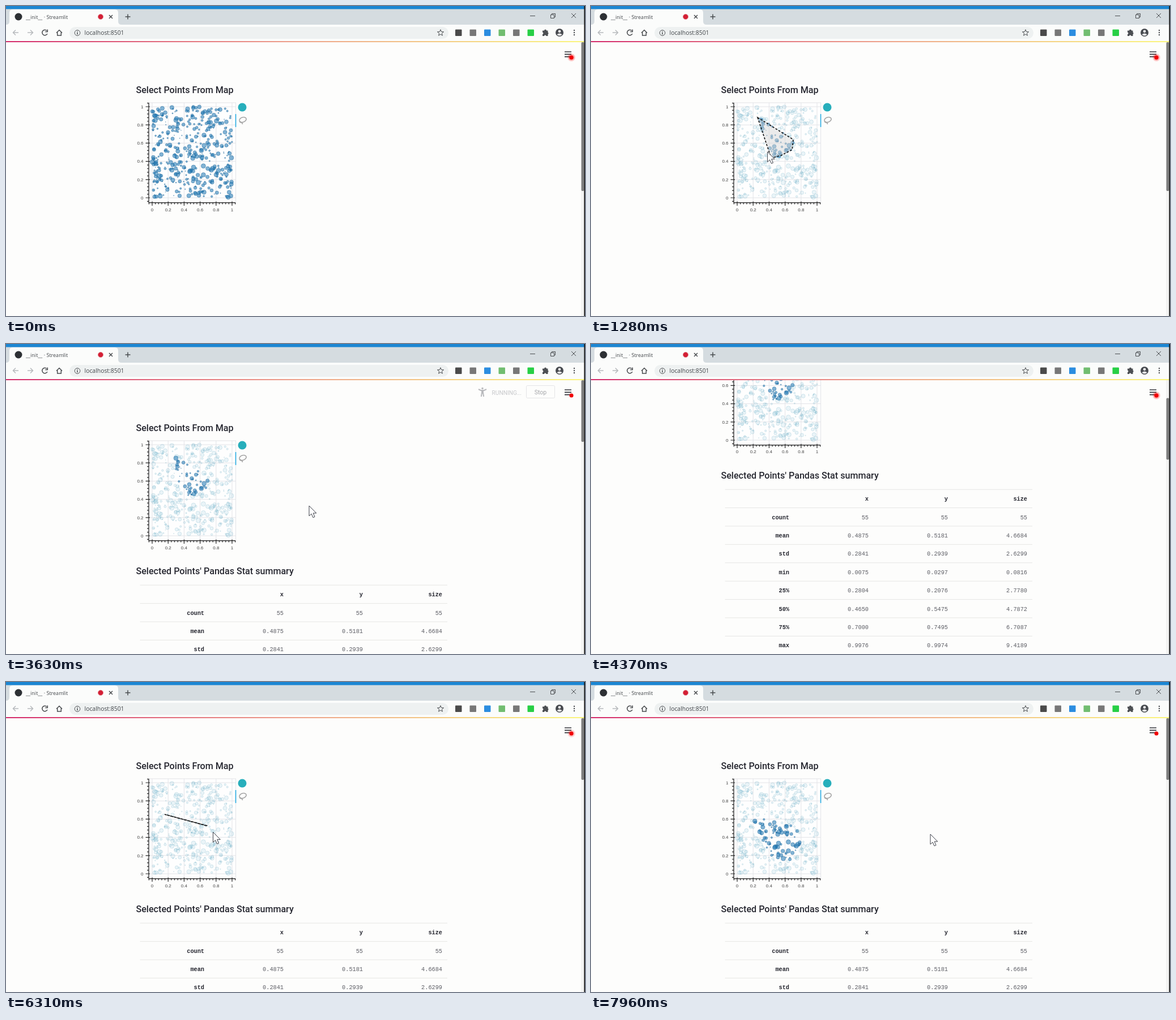
An HTML page for the animation above (8000 ms loop, 1022x548 px).

```html
<!DOCTYPE html>
<html lang="en">
<head>
<meta charset="utf-8">
<title>Select Points From Map</title>
<style>
html, body { margin: 0; width: 100%; height: 100%; overflow: hidden; background: #fdfdfc; }
svg { display: block; width: 1022px; height: 548px; }
.ui { font-family: "Open Sans", sans-serif; fill: #42464a; }
.axis { font: 8px "Liberation Sans", sans-serif; fill: #444; }
.head { font: 500 16.1px Roboto, sans-serif; fill: #262730; }
.cell { font: 10.25px "Liberation Mono", monospace; fill: #5c5d64; text-anchor: end; }
.bold { font-weight: 700; fill: #262730; }
.dot { fill: #1f77b4; stroke: #1f6698; fill-opacity: .56; stroke-opacity: .5; stroke-width: .9; }
.faded { fill: #3f9bc4; stroke: #3a90aa; fill-opacity: .1; stroke-opacity: .2; }
.icon { fill: none; stroke: #4a4d50; stroke-width: 1.5; }
.thin { stroke-width: 1; }
.status { font-family: Roboto, sans-serif; }
</style>
</head>
<body>
<svg viewBox="0 0 1022 548">
  <defs>
    <linearGradient id="rainbow">
      <stop offset="0" stop-color="#d42a6b"/>
      <stop offset=".5" stop-color="#eda08a"/>
      <stop offset="1" stop-color="#fbf67c"/>
    </linearGradient>
    <radialGradient id="halo">
      <stop offset=".3" stop-color="#f00" stop-opacity=".65"/>
      <stop offset="1" stop-color="#f00" stop-opacity="0"/>
    </radialGradient>
  </defs>
  <rect width="1022" height="548" fill="#fdfdfc"/>
  <g id="page">
    <text class="head" x="229.5" y="154">Select Points From Map</text>
    <g id="plot"></g>
    <g id="dots"></g>
    <circle cx="417" cy="179" r="7.5" fill="#27aebb"/>
    <path d="M405.5 191V214" stroke="#26aae1" stroke-width="1.6"/>
    <g fill="none" stroke="#a5a5a5" stroke-width="1.6">
      <ellipse cx="418" cy="201" rx="6.3" ry="4.2" transform="rotate(-20 418 201)"/>
      <path d="M413 203q-1 3 2 3t2 3"/>
    </g>
    <polygon id="lasso" fill="#d3d3d3" fill-opacity=".45" stroke="#111" stroke-width="1.6" stroke-dasharray="3.6 2.6"/>
    <g id="table"></g>
  </g>
  <g id="running">
    <g stroke="#b9babd" stroke-width="2" fill="none">
      <circle cx="841" cy="78.5" r="1.8" fill="#b9babd" stroke="none"/>
      <path d="M841 82V88" stroke-width="4"/>
      <path id="limbs"/>
    </g>
    <text class="status" x="857.5" y="90" font-size="10.2" fill="#c6c7ca">RUNNING...</text>
    <rect x="918.5" y="73.5" width="50" height="22" rx="2" fill="none" stroke="#e4e4e6"/>
    <text class="status" x="943.5" y="88.5" text-anchor="middle" font-size="10.5" fill="#a5a6aa">Stop</text>
  </g>
  <path d="M986 81H998M986 85.3H998M986 89.6H998" stroke="#33343a" stroke-width="1.7"/>
  <circle id="glow" cx="998" cy="91" r="7.5" fill="url(#halo)"/>
  <circle cx="998" cy="91" r="3.5" fill="#f00005"/>
  <rect x="1015" y="64" width="6" height="484" fill="#f3f3f2"/>
  <rect id="thumb" x="1015.5" width="5" rx="2" fill="#7f7f7f"/>
  <path id="cursor" d="M0 0V18L4.1 14.2 7 20.8 10 19.5 7.2 13H12.8Z" fill="#fff" stroke="#3c3f48"/>

  <g id="browser">
    <rect width="1022" height="34" fill="#d5dce0"/>
    <rect width="1022" height="5.5" fill="#1b86d3"/>
    <path d="M0 33Q6 33 6 27V12Q6 6 12 6H192Q198 6 198 12V27Q198 33 204 33H1022V62H0Z" fill="#fbfcfb"/>
    <circle cx="22" cy="19" r="6.5" fill="#2d3034"/>
    <text class="ui" x="35" y="22.5" font-size="9">__init__ · Streamlit</text>
    <circle cx="167" cy="19" r="4.6" fill="#d31f35" stroke="#e58b93"/>
    <path class="icon" d="M182 16L188 22M188 16L182 22M215 14.5V23.5M210.5 19H219.5"/>
    <path class="icon thin" d="M925 17.5H934M998 13L1006 21M1006 13L998 21M961.5 15.5H967.5V21.5H961.5ZM963.5 15V13.5H969.5V19.5H968"/>
    <path class="icon" style="stroke:#b7babd" d="M22 47H12.5M17 42.5L12.5 47L17 51.5M38 47H47.5M43 42.5L47.5 47L43 51.5"/>
    <path class="icon" d="M72 43.5A4.8 4.8 0 1 0 73 49M73.3 41.5V45.5H69.3M89 47.5L94 42.5L99 47.5M90.7 46.5V52H97.3V46.5"/>
    <rect x="112" y="37" width="669" height="21" rx="10.5" fill="#eef1f1"/>
    <circle class="icon thin" cx="126" cy="47.5" r="4.8"/>
    <path class="icon" d="M126 46.5V50.3M126 44.4V45.6"/>
    <text class="ui" x="138.5" y="51.3" font-size="10.4">localhost:8501</text>
    <path id="star" class="icon thin"/>
    <g id="extensions"></g>
    <path d="M947 43.5H950A2 2 0 0 1 954 43.5H956.5V46.5A2 2 0 0 1 956.5 50V53H953.5A1.8 1.8 0 0 0 950 53H947V50A1.8 1.8 0 0 0 947 46.5Z" fill="#4c4f53"/>
    <circle cx="977" cy="47" r="7" fill="#484b50"/>
    <circle cx="977" cy="44.7" r="2.3" fill="#fff"/>
    <path d="M972.5 50.5Q977 46.5 981.5 50.5Q977 54.5 972.5 50.5" fill="#fff"/>
    <path d="M1003 43V52" stroke="#4c4f53" stroke-width="2.4" stroke-linecap="round" stroke-dasharray="0 4"/>
    <rect y="62" width="1022" height="2" fill="url(#rainbow)"/>
  </g>
  <path d="M1021.2 0V548" stroke="#141414" stroke-width="1.6"/>
</svg>
<script>
const LOOP = 8000;
const $ = id => document.getElementById(id);
const range = n => [...Array(n).keys()];
const ramp = (t, from, to) => Math.min(1, Math.max(0, (t - from) / (to - from)));
const text = (cls, x, y, s, extra = '') => `<text class="${cls}" x="${x}" y="${y}" ${extra}>${s}</text>`;

// Plot coordinates
const px = x => 258 + 141 * x;
const py = y => 339 - 161 * y;

function drawPlot() {
  let grid = '', ticks = 'M252 171V348M252 347.7H405', labels = '';
  for (let i = -1; i <= 26; i++) {
    const major = i % 5 === 0, v = i / 25;
    const x = px(v), y = py(v);
    ticks += `M${major ? 246.5 : 249} ${y}H${major ? 254 : 252}`;
    ticks += `M${x} ${major ? 345.5 : 347.7}V${major ? 353 : 350.5}`;
    if (major) {
      grid += `M${x} 171V348M252 ${y}H405`;
      labels += text('axis', 242.5, y + 2.8, v, 'text-anchor="end"');
      labels += text('axis', x, 362.5, v, 'text-anchor="middle"');
    }
  }
  $('plot').innerHTML = `<rect x="252" y="171" width="153.5" height="177" fill="#fefefe" stroke="#e3e4e8"/>
    <path d="${grid}" stroke="#e3e4e8"/><path d="${ticks}" stroke="#222" stroke-width="1.2"/>${labels}`;
}

function drawTable() {
  const rows = [
    ['', 'x', 'y', 'size'],
    ['count', '55', '55', '55'],
    ['mean', '0.4875', '0.5181', '4.6684'],
    ['std', '0.2841', '0.2939', '2.6299'],
    ['min', '0.0075', '0.0297', '0.0816'],
    ['25%', '0.2804', '0.2076', '2.7780'],
    ['50%', '0.4650', '0.5475', '4.7872'],
    ['75%', '0.7000', '0.7495', '6.7087'],
    ['max', '0.9976', '0.9974', '9.4189'],
  ];
  let out = text('head', 229.5, 407, "Selected Points' Pandas Stat summary");
  rows.forEach((row, r) => {
    const top = 426.2 + 32.4 * r;
    out += `<path d="M236.5 ${top}H779" stroke="#e6e6e4"/>`;
    row.forEach((s, c) => out += text(r && c ? 'cell' : 'cell bold', 350 + 140 * c, top + 20, s));
  });
  $('table').innerHTML = out;
}

function drawIcons() {
  const colors = ['#4a4a4a', '#777', '#2b8de0', '#71bd70', '#777', '#27cf45'];
  $('extensions').innerHTML = colors.map((c, i) =>
    `<rect x="${793 + 25.5 * i}" y="41.5" width="11.5" height="11.5" rx="1" fill="${c}"/>`).join('');
  $('star').setAttribute('d', 'M' + range(10).map(i => {
    const r = i % 2 ? 2.5 : 5.8, a = i * Math.PI / 5;
    return [767 + r * Math.sin(a), 47.5 - r * Math.cos(a)];
  }).join('L') + 'Z');
}

// Turns corner points into [time, x, y] keys at constant speed
function stroke(start, end, corners) {
  let length = 0;
  const steps = corners.map(([x, y], i) => {
    const [lastX, lastY] = corners[Math.max(0, i - 1)];
    return length += Math.hypot(x - lastX, y - lastY);
  });
  return corners.map((p, i) => [start + (end - start) * steps[i] / length, ...p]);
}

function at(keys, t) {
  const next = keys.findIndex(k => k[0] > t);
  if (next <= 0) return keys.at(next).slice(1);
  const [a, b] = [keys[next - 1], keys[next]];
  const f = ramp(t, a[0], b[0]);
  return [a[1] + (b[1] - a[1]) * f, a[2] + (b[2] - a[2]) * f];
}

const firstLasso = stroke(840, 1350, [[294, 197], [357, 236], [355, 254], [336, 264], [318, 269], [300, 238]]);
const secondLasso = stroke(6060, 6720, [[280, 234], [355, 254], [377, 278], [355, 313], [326, 317], [290, 264]]);
const cursorPath = [
  [300, 1040, 300], ...firstLasso, [2350, 535, 286], [3800, 535, 286],
  [4130, 1030, 90], [5600, 1030, 90], ...secondLasso, [7420, 599, 269],
];
const LAG = 40;

function lassoShape(path, t) {
  const tip = t - LAG;
  return [...path.filter(k => k[0] <= tip).map(k => k.slice(1)), at(path, tip)];
}

function inside(shape, x, y) {
  let hit = false;
  shape.forEach(([ax, ay], i) => {
    const [bx, by] = shape[(i + 1) % shape.length];
    if (ay > y !== by > y && x < (bx - ax) * (y - ay) / (by - ay) + ax) hit = !hit;
  });
  return hit;
}

let seed = 41;
const random = () => (seed = (seed * 16807) % 2147483647) / 2147483647;
const points = range(450).map(() => ({ x: px(random()), y: py(random()), r: .4 + 3.6 * random() }));

drawPlot();
drawTable();
drawIcons();
$('dots').innerHTML = points.map(p =>
  `<circle class="dot" cx="${p.x}" cy="${p.y}" r="${p.r}"/>`).join('');
const dots = [...$('dots').children];

function render(t) {
  const path = t >= secondLasso[0][0] ? secondLasso : firstLasso;
  const started = t >= path[0][0];
  const drawing = started && t < path.at(-1)[0] + 2 * LAG;
  const shape = lassoShape(path, t);
  dots.forEach((dot, i) => dot.classList.toggle('faded', started && !inside(shape, points[i].x, points[i].y)));
  $('lasso').setAttribute('points', drawing ? shape.join(' ') : '');

  const scroll = 185 * (ramp(t, 4170, 4390) - ramp(t, 5300, 5600));
  const hasTable = t >= 3320;
  $('page').setAttribute('transform', `translate(0 ${-scroll})`);
  $('table').style.display = hasTable ? '' : 'none';
  $('thumb').setAttribute('y', 64 + scroll * .186);
  $('thumb').setAttribute('height', hasTable ? 109 : 263);

  $('cursor').setAttribute('transform', `translate(${at(cursorPath, t)})`);

  $('running').style.opacity = ramp(t, 1900, 2200) - ramp(t, 3900, 4100);
  const lift = Math.floor(t / 140) % 2 * 2;
  $('limbs').setAttribute('d', `M834 ${82 - lift}L838 82H844L848 ${82 - lift}M839.8 87L${839.8 - lift / 2} 93M842.2 87L${842.2 + lift / 2} 93`);

  $('glow').style.opacity = Math.sqrt(Math.abs(Math.sin(Math.PI * (t - 743) / 1443.3)));
}

function tick() {
  render(performance.now() % LOOP);
  requestAnimationFrame(tick);
}
tick();
</script>
</body>
</html>
```
